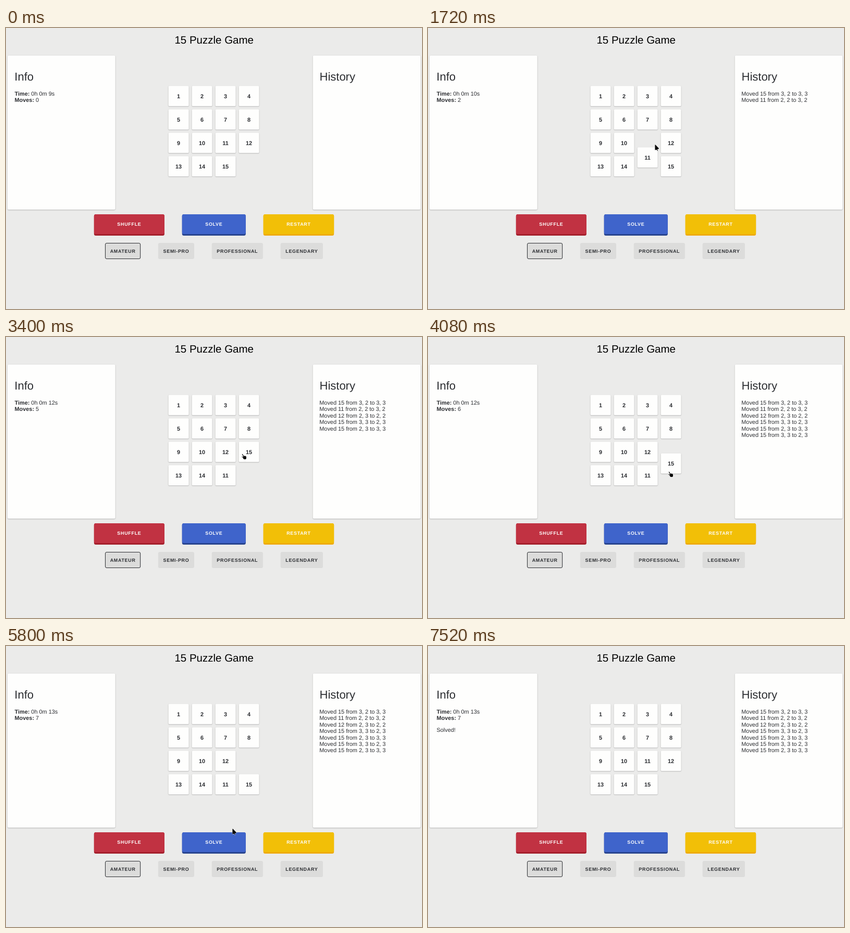
An HTML page with a canvas that plays this animation: 798 px wide and 540 px high, repeating every 9.6 s.

```html
<!DOCTYPE html>
<html lang="en">
<head>
<meta charset="utf-8">
<title>15 Puzzle Game</title>
<style>
  html, body { margin: 0; width: 100%; height: 100%; overflow: hidden; background: #ebebea; }
  canvas { display: block; }
</style>
</head>
<body>
<canvas id="stage" width="798" height="540"></canvas>
<script>
const ctx = document.getElementById('stage').getContext('2d');
const FAMILY = '"Liberation Sans", Arial, sans-serif';
const INK = '#2b2d31', PAPER = '#fefefd', BACK = '#ebebea';
const LOOP = 9600, TICK = 40, SLIDE = 250, TRAVEL = 180;
const ENTER = 200, SOLVE_CLICK = 6390, SOLVE_STEP = 220, LEAVE = 7480;
const PITCH = 45, TILE = 39, LEFT = 311.6, TOP = 111.3;
const BODY = 10.9, LINE = 12.4, FIRST_LINE = 130;

const clamp = v => Math.min(1, Math.max(0, v));
const mix = (a, b, p) => a + (b - a) * p;
const home = n => ({ col: (n - 1) % 4, row: Math.floor((n - 1) / 4) });

// Each click sends a tile into the gap; x is where the pointer rests.
const clicks = [
  { at: 1010, tile: 15, x: 434 }, { at: 1630, tile: 11, x: 436 },
  { at: 2130, tile: 12, x: 455 }, { at: 2672, tile: 15, x: 453 },
  { at: 3400, tile: 15, x: 454 }, { at: 4006, tile: 15, x: 463 },
  { at: 5275, tile: 15, x: 464 }
];
const solution = [12, 11, 15].map((tile, i) => ({ at: SOLVE_CLICK + i * SOLVE_STEP, tile }));

const cells = {};
let gap = home(16);
const moves = [...clicks, ...solution].map(move => {
  const from = cells[move.tile] || home(move.tile), to = gap;
  cells[move.tile] = to;
  gap = from;
  return { ...move, from, to };
});
const played = moves.slice(0, clicks.length);
const SOLVED_AT = moves.at(-1).at;

// The pointer sets off for the next tile as soon as the last slide ends.
const stops = [{ at: ENTER, x: 564, y: 224 }, { at: 320, x: 434, y: 224 }, { at: 520, x: 434, y: 224 }];
played.forEach(({ x, from }, i) => {
  const y = 225 + (from.row - 2) * 34;
  if (i) {
    const depart = played[i - 1].at + SLIDE;
    stops.push({ ...stops.at(-1), at: depart }, { at: depart + TRAVEL, x, y });
  } else stops.push({ at: 800, x, y });
});
stops.push({ ...stops.at(-1), at: played.at(-1).at + SLIDE },
  { at: 5800, x: 435, y: 352 }, { at: 6080, x: 419, y: 370 });

// CSS "ease": cubic-bezier(.25, .1, .25, 1)
function ease(x) {
  if (x <= 0 || x >= 1) return clamp(x);
  const bezier = (s, a, b) => 3 * (1 - s) ** 2 * s * a + 3 * (1 - s) * s * s * b + s ** 3;
  let low = 0, high = 1;
  for (let i = 0; i < 20; i++) {
    const mid = (low + high) / 2;
    if (bezier(mid, .25, .25) < x) low = mid; else high = mid;
  }
  return bezier(low, .1, 1);
}

function tilePosition(n, t) {
  const move = moves.findLast(m => m.tile === n && m.at <= t);
  const { from, to } = move || { from: home(n), to: home(n) };
  const p = move ? ease((t - move.at) / SLIDE) : 0;
  return {
    x: LEFT + mix(from.col, to.col, p) * PITCH,
    y: TOP + mix(from.row, to.row, p) * PITCH
  };
}

function pointerAt(t) {
  if (t < ENTER || t >= LEAVE) return null;
  const i = stops.findLastIndex(s => s.at <= t);
  const a = stops[i], b = stops[i + 1];
  if (!b) return a;
  const p = (t - a.at) / (b.at - a.at);
  return { x: mix(a.x, b.x, p), y: mix(a.y, b.y, p) };
}

function setFont(size, bold, spacing) {
  ctx.font = `${bold ? 'bold ' : ''}${size}px ${FAMILY}`;
  ctx.letterSpacing = spacing + 'px';
  ctx.textRendering = 'geometricPrecision';
}

function text(str, x, y, size, { bold = false, color = INK, align = 'left', spacing = 0 } = {}) {
  setFont(size, bold, spacing);
  ctx.textAlign = align;
  ctx.fillStyle = color;
  ctx.fillText(str, x, y);
  return ctx.measureText(str).width;
}

function box(x, y, w, h, r, fill) {
  ctx.beginPath();
  ctx.roundRect(x, y, w, h, r);
  ctx.fillStyle = fill;
  ctx.fill();
}

function card(x, y, w, h) {
  ctx.save();
  ctx.shadowColor = 'rgba(0,0,0,.28)';
  ctx.shadowBlur = 2;
  ctx.shadowOffsetY = .8;
  box(x, y, w, h, 2, PAPER);
  ctx.restore();
}

function labelled(label, value, y) {
  const w = text(label, 16.5, y, BODY, { bold: true });
  text(' ' + value, 16.5 + w, y, BODY);
}

// Lays buttons out in one centred row, each as wide as its label plus padding.
function buttonRow(buttons, padding, drawButton) {
  const size = 8.96, spacing = .69, space = 33.8;
  setFont(size, true, spacing);
  const widths = buttons.map(b => ctx.measureText(b.label).width + padding);
  const total = widths.reduce((sum, w) => sum + w, space * (buttons.length - 1));
  let x = 399 - total / 2;
  buttons.forEach((button, i) => {
    const { color, baseline } = drawButton(button, x, widths[i]);
    text(button.label, x + padding / 2, baseline, size, { bold: true, color, spacing });
    x += widths[i] + space;
  });
}

function actionButton({ face, lip, sink = 0 }, x, w) {
  box(x, 358 + sink, w, 41 - sink, 3.5, lip);
  box(x, 358 + sink, w, 38, 3.5, face);
  return { color: '#fdfdfc', baseline: 380 + sink };
}

function levelButton({ selected }, x, w) {
  box(x, 413, w, 31, 3, '#dcdcdb');
  if (selected) {
    ctx.beginPath();
    ctx.roundRect(x + .5, 413.5, w - 1, 30, 2.5);
    ctx.strokeStyle = INK;
    ctx.lineWidth = 1;
    ctx.stroke();
  }
  return { color: INK, baseline: 431.6 };
}

function drawArrow() {
  ctx.beginPath();
  ctx.moveTo(0, 0);
  ctx.lineTo(0, 9);
  ctx.lineTo(6.4, 6.6);
  ctx.closePath();
  ctx.moveTo(2, 6);
  ctx.lineTo(4.2, 10.6);
}

function drawHand() {
  ctx.beginPath();
  ctx.moveTo(-.6, .4);
  ctx.lineTo(2.6, 5.6);
  ctx.moveTo(-1, 5.2);
  ctx.lineTo(2, 7);
  ctx.roundRect(1.4, 4.2, 5, 5.2, 2);
}

function drawPointer({ x, y }, shape) {
  ctx.save();
  ctx.translate(x, y);
  ctx.lineJoin = ctx.lineCap = 'round';
  shape();
  for (const [color, width] of [['rgba(255,255,255,.6)', 2.4], ['#0a0a0a', 1.2]]) {
    ctx.strokeStyle = color;
    ctx.lineWidth = width;
    ctx.stroke();
  }
  ctx.fillStyle = '#0a0a0a';
  ctx.fill();
  ctx.restore();
}

function draw(t) {
  ctx.fillStyle = BACK;
  ctx.fillRect(0, 0, 798, 540);
  text('15 Puzzle Game', 399.2, 30, 20.5, { color: '#000', align: 'center' });

  card(3, 53, 206.7, 296);
  card(588.6, 53, 206.7, 296);
  text('Info', 16.3, 101, 22);
  text('History', 601.5, 101, 22);

  const done = played.filter(m => m.at <= t);
  const seconds = Math.min(13, 9 + Math.floor((t + 560) / 1240));
  labelled('Time:', `0h 0m ${seconds}s`, FIRST_LINE);
  labelled('Moves:', done.length, FIRST_LINE + LINE);
  if (t >= SOLVED_AT) text('Solved!', 16.5, 165.2, BODY);
  done.forEach(({ tile, from, to }, i) =>
    text(`Moved ${tile} from ${from.row}, ${from.col} to ${to.row}, ${to.col}`,
      601.3, FIRST_LINE + i * LINE, BODY));

  const pointer = pointerAt(t);
  const inside = (x, y, w, h) => pointer &&
    pointer.x >= x && pointer.x <= x + w && pointer.y >= y && pointer.y <= y + h;
  let clickable = inside(338, 358, 122, 41);

  const sink = clickable ? 1.2 : 0;
  buttonRow([
    { label: 'SHUFFLE', face: '#c13242', lip: '#a41f2c' },
    { label: 'SOLVE', face: '#3f64cb', lip: '#28448f', sink },
    { label: 'RESTART', face: '#f2bf07', lip: '#eeab0e' }
  ], 89, actionButton);
  buttonRow([
    { label: 'AMATEUR', selected: true }, { label: 'SEMI-PRO' },
    { label: 'PROFESSIONAL' }, { label: 'LEGENDARY' }
  ], 19.2, levelButton);

  for (let n = 1; n <= 15; n++) {
    const { x, y } = tilePosition(n, t);
    card(x, y, TILE, TILE);
    text(n, x + TILE / 2, y + 23.5, BODY, { bold: true, align: 'center' });
    clickable ||= inside(x, y, TILE, TILE);
  }
  if (pointer) drawPointer(pointer, clickable ? drawHand : drawArrow);
}

let origin;
function loop(now) {
  origin ??= now;
  draw(Math.floor((now - origin) % LOOP / TICK) * TICK);
  requestAnimationFrame(loop);
}
draw(0);
requestAnimationFrame(loop);
</script>
</body>
</html>
```
